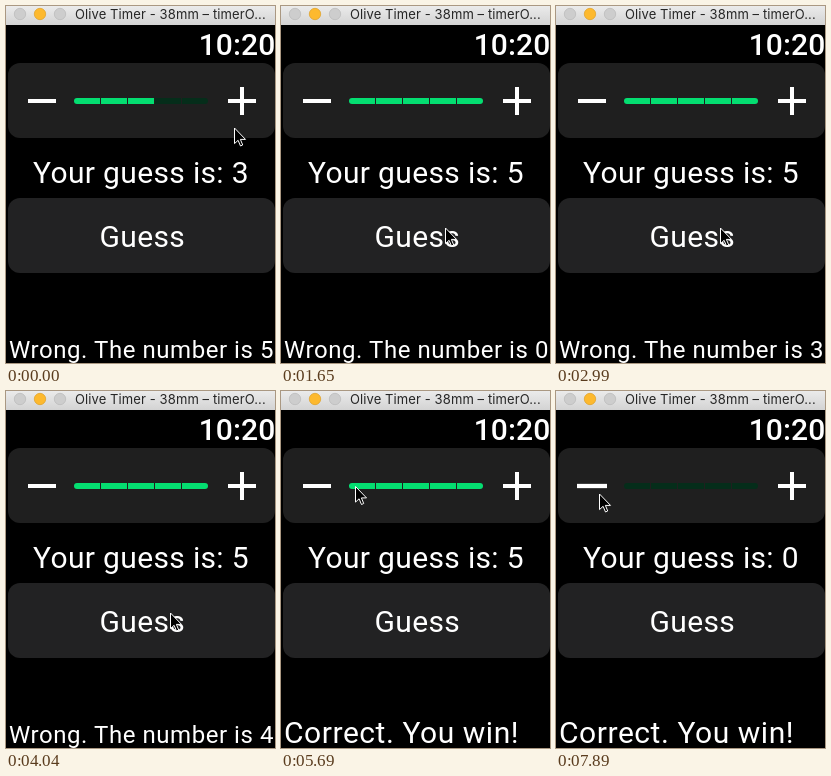
An HTML page that plays this animation: 269x357 px, repeating every 8000 ms.

```html
<!DOCTYPE html>
<html lang="en">
<head>
<meta charset="utf-8">
<title>Guessing game</title>
<style>
  html, body { margin: 0; width: 100%; height: 100%; overflow: hidden; background: #000; }
  svg { display: block; width: 100%; height: 100%; }
  text { font-family: Roboto, sans-serif; font-size: 30px; letter-spacing: .35px; fill: #fff; white-space: pre; }
  .title { font-family: Inter, sans-serif; font-size: 13px; letter-spacing: .1px; fill: #262626; }
  .clock { font-weight: 500; letter-spacing: .1px; }
  .result { letter-spacing: .55px; }
  .small { font-size: 24px; }
  .sign { stroke: #fff; stroke-width: 4; fill: none; }
</style>
</head>
<body>
<svg viewBox="0 0 269 357">
  <defs>
    <linearGradient id="chrome" x2="0" y2="1">
      <stop stop-color="#ebebeb"/>
      <stop offset="1" stop-color="#d3d3d3"/>
    </linearGradient>
    <clipPath id="track"><rect x="68" y="92" width="134" height="6" rx="3"/></clipPath>
  </defs>
  <rect width="269" height="357"/>

  <rect width="269" height="19" fill="url(#chrome)"/>
  <g stroke-width=".7">
    <circle cx="14" cy="8" r="5.7" fill="#cdcdcd" stroke="#b9b9b9"/>
    <circle cx="34" cy="8" r="5.7" fill="#fdb92e" stroke="#dfa023"/>
    <circle cx="54" cy="8" r="5.7" fill="#cdcdcd" stroke="#b9b9b9"/>
  </g>
  <text class="title" x="69" y="13">Olive Timer - 38mm – timerO...</text>
  <text class="clock" x="269.3" y="49" text-anchor="end">10:20</text>

  <rect x="2" y="57" width="267" height="75" rx="12" fill="#1f1f1f"/>
  <path id="minus" class="sign" d="M-14 0H14"/>
  <path id="plus" class="sign" d="M-14 0H14M0-14V14"/>
  <g id="bar" clip-path="url(#track)"></g>

  <text id="guess" x="135" y="177" text-anchor="middle"></text>
  <g id="button">
    <rect x="2" y="192" width="267" height="75" rx="12" fill="#222223"/>
    <text x="136.3" y="241" text-anchor="middle">Guess</text>
  </g>
  <text id="result" x="3" y="352.4"></text>

  <path id="cursor" d="M0 0V15.6L3.6 12.3 6 18 8.2 17 5.9 11.4H11Z" fill="#000" stroke="#fff" stroke-linejoin="round"/>
</svg>
<script>
const LOOP = 8000;
const TICK = 148.8; // the screen refreshes once per tick
const $ = id => document.getElementById(id);

// Cursor stops: tick, x, y
const stops = [
  [0, 228.5, 122], [2, 234, 98], [5, 234, 98], [9, 164.5, 222], [32, 164.5, 222],
  [38, 74.5, 95.5], [40, 38.5, 96], [51, 38.5, 96], [53, 43.5, 103]
];
// Taps on the guess button: tick and the number drawn
const taps = [[-2, 5], [10, 0], [12, 1], [15, 2], [17, 4], [19, 3], [23, 5], [26, 4], [29, 5]];

function cursorAt(tick) {
  const next = stops.findIndex(([at]) => at > tick);
  if (next < 0) return stops.at(-1).slice(1);
  const [t0, x0, y0] = stops[next - 1];
  const [t1, x1, y1] = stops[next];
  const eased = 1 - (1 - (tick - t0) / (t1 - t0)) ** 2;
  return [x0 + (x1 - x0) * eased, y0 + (y1 - y0) * eased];
}

// Plus counts up from 3 to 5 every third tick, minus later counts down every second one.
function guessAt(tick) {
  return tick < 41
    ? Math.min(5, 3 + Math.floor(tick / 3))
    : Math.max(0, 5 - Math.floor((tick - 39) / 2));
}

const signScale = (tick, from, to) => tick < from || tick > to ? 1 : tick < to ? 1.14 : 1.07;

const segments = Array.from({ length: 5 }, (_, i) => {
  const rect = document.createElementNS("http://www.w3.org/2000/svg", "rect");
  const box = { x: 68 + 27 * i, y: 92, width: 26, height: 6 };
  for (const key in box) rect.setAttribute(key, box[key]);
  return $("bar").appendChild(rect);
});

function place(id, x, y, scale = 1) {
  $(id).setAttribute("transform", `translate(${x} ${y}) scale(${scale})`);
}

function draw(tick) {
  const guess = guessAt(tick);
  const [tapped, answer] = taps.findLast(([at]) => at < tick);
  const won = answer === guessAt(Math.max(0, tapped));
  const scale = taps.some(([at]) => at === tick) ? 0.96 : 1;

  place("cursor", ...cursorAt(tick));
  place("minus", 36, 95, signScale(tick, 41, 53));
  place("plus", 236, 95, signScale(tick, 2, 7));
  place("button", 135.5 * (1 - scale), 229.5 * (1 - scale), scale);
  $("button").setAttribute("opacity", scale < 1 ? 0.7 : 1);
  segments.forEach((rect, i) => rect.setAttribute("fill", i < guess ? "#04de71" : "#052d1a"));

  $("guess").textContent = `Your guess is: ${guess}`;
  $("result").textContent = won ? "Correct. You win!" : `Wrong. The number is ${answer}`;
  $("result").setAttribute("class", won ? "result" : "result small");
}

const start = performance.now();
function frame() {
  draw(Math.floor((performance.now() - start) % LOOP / TICK));
  requestAnimationFrame(frame);
}
frame();
</script>
</body>
</html>
```
